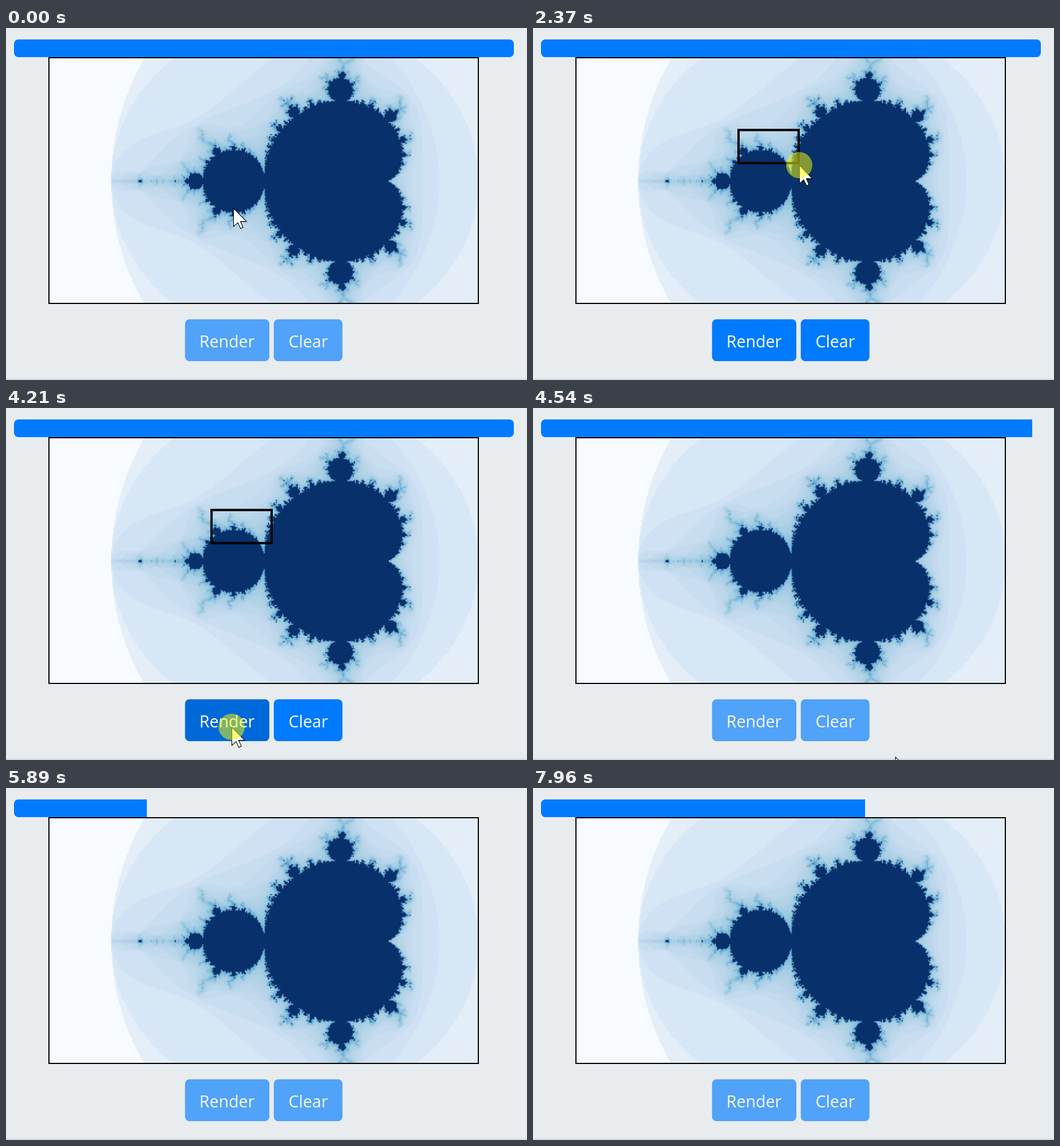
An HTML page with a canvas for the animation above (7.99 s loop, 910 px wide and 616 px high).

```html
<!DOCTYPE html>
<html lang="en">
<head>
<meta charset="utf-8">
<title>Fractal renderer</title>
<style>
  html, body { margin: 0; width: 100%; height: 100%; overflow: hidden; background: #e9ecef; }
  #stage { position: absolute; left: 0; top: 0; width: 910px; height: 616px; overflow: hidden; }
  #stage > * { position: absolute; }
  #track { left: 13.5px; top: 20px; width: 873px; height: 31px; border-radius: 7.5px; overflow: hidden; }
  #bar { width: 100%; height: 100%; background: #007bff; }
  #fractal { left: 74px; top: 51px; width: 748px; height: 428px; border: 2px solid #000; }
  #line { left: 0; top: 614px; width: 910px; height: 1px; background: #c3c7ca; }
  svg { left: 0; top: 0; }
  text { font: 28.6px "Open Sans", "Noto Sans", sans-serif; fill: #fff; text-anchor: middle; }
  .button { opacity: .65; }
  .button rect { fill: #007bff; }
</style>
</head>
<body>
<div id="stage">
  <div id="track"><div id="bar"></div></div>
  <canvas id="fractal" width="390" height="223"></canvas>
  <div id="line"></div>
  <svg width="910" height="616" viewBox="0 0 910 616">
    <g class="button">
      <rect id="render" x="312.7" y="509.7" width="147.3" height="73.3" rx="7.5"/>
      <text x="386" y="558.5">Render</text>
    </g>
    <g class="button">
      <rect x="467.7" y="509.7" width="120" height="73.3" rx="7.5"/>
      <text x="528" y="558.5">Clear</text>
    </g>
    <rect id="selection" x="359" y="178.5" fill="none" stroke="#000" stroke-width="4"/>
    <g id="pointer">
      <path d="M.5 .5V32.5L7.8 25.6L12.8 36L17.2 34L12.4 23.6H23Z" fill="#fff" stroke="#000" stroke-width="1.1"/>
      <circle id="press" r="23" fill="#ff0" fill-opacity=".5"/>
    </g>
  </svg>
</div>
<script>
const LOOP = 7990;
const $ = id => document.getElementById(id);

// Escape-time rendering, coloured on a logarithmic scale
const LIMIT = 50, SCALE_END = 1000;
const BLUES = ['f7fbff', 'deebf7', 'c6dbef', '9ecae1', '6baed6', '4292c6', '2171b5', '08519c', '08306b']
  .map(hex => [0, 2, 4].map(i => parseInt(hex.slice(i, i + 2), 16)));

function shade(n) {
  if (n === LIMIT) return BLUES[8];
  const p = Math.log(n + 1) / Math.log(SCALE_END) * 8;
  const k = Math.floor(p);
  return BLUES[k].map((v, i) => v + (BLUES[k + 1][i] - v) * (p - k));
}

function escapeCount(a, b) {
  let x = 0, y = 0, n = 0;
  while (n < LIMIT && x * x + y * y <= 4) {
    [x, y] = [x * x - y * y + a, 2 * x * y + b];
    n++;
  }
  return x * x + y * y > 4 ? n - 1 : LIMIT;
}

function drawFractal(canvas) {
  const { width, height } = canvas;
  const ctx = canvas.getContext('2d');
  const image = ctx.createImageData(width, height);
  for (let j = 0, p = 0; j < height; j++)
    for (let i = 0; i < width; i++, p += 4) {
      const n = escapeCount(-2.5 + 3.5 * i / width, -1 + 2 * j / height);
      image.data.set([...shade(n), 255], p);
    }
  ctx.putImageData(image, 0, 0);
}

// Each change is [start, end, value, easing]; equal start and end make a jump
function play(el, toStyle, value, ...changes) {
  const frames = [{ offset: 0, ...toStyle(value) }];
  for (const [start, end, next, easing = 'linear'] of changes) {
    frames.push({ offset: start / LOOP, easing, ...toStyle(value) });
    frames.push({ offset: end / LOOP, ...toStyle(next) });
    value = next;
  }
  frames.push({ offset: 1, ...toStyle(value) });
  el.animate(frames, { duration: LOOP, iterations: Infinity });
}

const opacity = v => ({ opacity: v });
const fill = v => ({ fill: v });
const width = v => ({ width: `${v}px` });
const place = ([x, y]) => ({ transform: `translate(${x}px, ${y}px)` });
const box = w => ({ width: `${w}px`, height: `${w * .552}px` });

const DRAG = [1090, 1760], DROP = 2370, CLICK = 4210, RELEASE = 4300;

drawFractal($('fractal'));

play($('pointer'), place, [397, 315],
  [20, 390, [343, 166], 'ease-in-out'],
  [390, 590, [358, 178], 'ease-in-out'],
  [...DRAG, [465, 240], 'ease-in-out'],
  [2760, 3240, [394, 558], 'cubic-bezier(.25, .3, .5, 1)'],
  [RELEASE, 4600, [691, 623]]);

play($('selection'), box, 0, [...DRAG, 105, 'ease-in-out']);
play($('selection'), opacity, 0, [1130, 1130, 1], [RELEASE, RELEASE, 0]);

play($('press'), opacity, 0, [770, 770, 1], [2420, 2420, 0], [CLICK, CLICK, 1], [RELEASE, RELEASE, 0]);

for (const button of document.querySelectorAll('.button'))
  play(button, opacity, .65, [DROP, DROP, 1], [RELEASE, RELEASE, .65]);

play($('render'), fill, '#007bff', [3070, 3220, '#0069d9'], [RELEASE, RELEASE, '#007bff']);

play($('bar'), width, 873,
  [4530, 6200, 224.5, 'cubic-bezier(.15, .52, .3, 1)'],
  [6300, 7960, 566.5, 'cubic-bezier(.32, 0, .67, 0)']);
</script>
</body>
</html>
```
